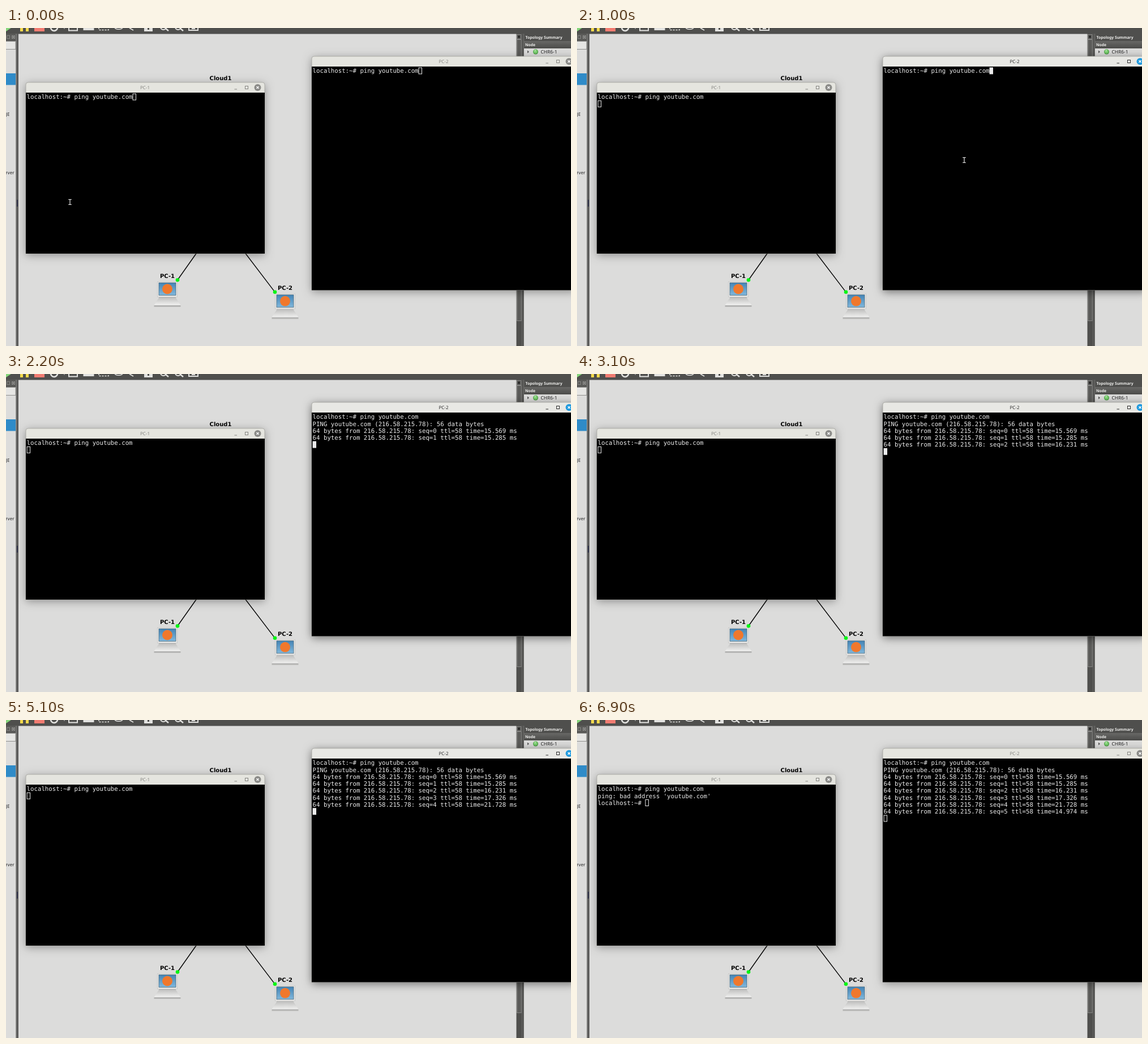
Animation, 998 px wide and 561 px high, one loop 7 s. Source, as an HTML page with a canvas:

```html
<!DOCTYPE html>
<html lang="en">
<head>
<meta charset="utf-8">
<title>Ping from two hosts</title>
<style>
html, body { margin: 0; width: 100%; height: 100%; overflow: hidden; background: #dcdcdb; }
canvas { display: block; width: 998px; height: 561px; }
</style>
</head>
<body>
<canvas id="stage" width="998" height="561"></canvas>
<script>
const ctx = document.getElementById('stage').getContext('2d');
const LOOP = 7000;
const UI = '"Noto Sans", "Open Sans", sans-serif';
const CELL = { w: 6.446, h: 12.25 };
const DARK = '#4f4f4d', LIGHT = '#dcdcdb', ICON = '#e2e2e0';

const PROMPT = 'localhost:~# ';
const COMMAND = PROMPT + 'ping youtube.com';
const REPLY_MS = ['15.569', '15.285', '16.231', '17.326', '21.728', '14.974'];

function rect(x, y, w, h, color) {
  ctx.fillStyle = color;
  ctx.fillRect(x, y, w, h);
}

function frame(x, y, w, h, color, width = 1) {
  ctx.strokeStyle = color;
  ctx.lineWidth = width;
  ctx.strokeRect(x, y, w, h);
}

function disc(x, y, r, color) {
  ctx.fillStyle = color;
  ctx.beginPath();
  ctx.arc(x, y, r, 0, Math.PI * 2);
  ctx.fill();
}

function ring(x, y, r, color, width, from = 0, to = Math.PI * 2) {
  ctx.strokeStyle = color;
  ctx.lineWidth = width;
  ctx.beginPath();
  ctx.arc(x, y, r, from, to);
  ctx.stroke();
}

function line(x1, y1, x2, y2, color, width) {
  ctx.strokeStyle = color;
  ctx.lineWidth = width;
  ctx.beginPath();
  ctx.moveTo(x1, y1);
  ctx.lineTo(x2, y2);
  ctx.stroke();
}

function shape(points, color) {
  ctx.fillStyle = color;
  ctx.beginPath();
  points.forEach(([x, y]) => ctx.lineTo(x, y));
  ctx.closePath();
  ctx.fill();
}

function fade(y1, y2, top, bottom) {
  const g = ctx.createLinearGradient(0, y1, 0, y2);
  g.addColorStop(0, top);
  g.addColorStop(1, bottom);
  return g;
}

function label(text, x, y, font, color, align = 'left') {
  ctx.font = font;
  ctx.fillStyle = color;
  ctx.textAlign = align;
  ctx.fillText(text, x, y);
}

function drawToolbar() {
  rect(0, 0, 998, 10.5, DARK);
  shape([[0, 0], [9, 0], [0, 6]], '#86d67c');
  rect(25, 0, 5, 6, '#f4d94c');
  rect(35, 0, 5, 6, '#f4d94c');
  rect(50, 0, 18, 6, '#f27c72');
  ring(85, -1, 6, ICON, 2.6, -0.2, Math.PI);
  rect(102, 0, 2, 1.5, '#999');
  frame(111, -6, 15, 10.5, ICON, 2);
  rect(136.5, 0, 19, 4, ICON);
  ctx.setLineDash([3, 2]);
  frame(164, -6, 17, 9.5, ICON, 1.5);
  ctx.setLineDash([]);
  ctx.strokeStyle = ICON;
  ctx.lineWidth = 1.5;
  ctx.beginPath();
  ctx.ellipse(199, -1, 7, 3.2, 0, 0, Math.PI * 2);
  ctx.stroke();
  line(218, 0, 225, 4, ICON, 1.8);
  rect(244, 0, 15, 6, ICON);
  rect(250, 0, 3, 3, DARK);
  for (const x of [278, 304]) {
    ring(x, -2, 5, ICON, 2);
    line(x + 3, 0, x + 9, 5, ICON, 2.4);
  }
  frame(323, -6, 16, 10, ICON, 2);
  rect(328, 0, 6, 2, ICON);
}

function drawSidePanels() {
  rect(0, 10, 18, 13, '#5a5a58');
  frame(1.5, 13.5, 5, 5, '#858583');
  frame(10.5, 13.5, 5, 5, '#858583');
  line(11, 14, 15, 18, '#a0a09e', 1);
  line(15, 14, 11, 18, '#a0a09e', 1);
  rect(0, 23, 18, 15, '#e6e6e4');
  frame(-2, 23.5, 19, 14, '#8e8e8c');
  rect(0, 80, 17, 20.5, '#2f8bc8');
  label('JE', 6.5, 155, '8px ' + UI, '#222', 'right');
  label('erver', 14.5, 258, '8px ' + UI, '#222', 'right');
  rect(17.5, 10, 4.5, 551, '#5c5c5b');
  rect(17.5, 10, 1, 551, '#858584');
  rect(19, 303, 2, 12, '#33364e');

  rect(901.5, 10, 13.5, 551, DARK);
  frame(902.5, 11.5, 7, 8, '#8b8b89');
  rect(904.5, 14, 3, 3, '#222');
  rect(903, 21, 6.5, 496, '#5b5b59');
  frame(902.5, 20.5, 7.5, 496, '#858583');
  rect(911, 10, 1, 551, '#696967');
  rect(914, 10, 1, 551, '#747472');

  rect(915, 10, 83, 26, DARK);
  label('Topology Summary', 917.5, 19.2, 'bold 6.8px ' + UI, '#f0f0ee');
  rect(915, 23, 83, 13, fade(23, 36, '#686866', '#4b4b49'));
  label('Node', 917, 32, 'bold 6.8px ' + UI, '#f0f0ee');
  shape([[921, 39.5], [924, 42], [921, 44.5]], '#555');
  disc(935.5, 42, 4.5, '#4f9c48');
  disc(935.3, 41.5, 3.5, '#77cf6c');
  disc(934.8, 40.2, 1.6, '#a9e5a0');
  label('CHR6-1', 944.5, 45, '8.4px ' + UI, '#222');
}

function drawHost(name, x, y) {
  label(name, x, y - 24.5, 'bold 10px "DejaVu Sans", sans-serif', '#000', 'center');
  rect(x - 18, y - 18, 36, 28, '#e9e9e8');
  frame(x - 17.5, y - 17.5, 35, 27, '#c9c9c8');
  rect(x - 15, y - 15.5, 30, 22, fade(y - 15, y + 7, '#4585b6', '#82b9dd'));
  frame(x - 15, y - 15.5, 30, 22, '#476578', 0.8);
  disc(x, y - 4.5, 9, '#f0782c');
  rect(x - 15, y + 10, 30, 1.5, '#b4b4b3');
  shape([[x - 15, y + 11], [x + 15, y + 11], [x + 23.5, y + 24], [x - 23.5, y + 24]],
    fade(y + 11, y + 24, '#c2c2c1', '#f0f0ef'));
  rect(x - 23.5, y + 24, 47, 3, '#b5b5b4');
}

function drawTopology() {
  label('Cloud1', 379, 92, 'bold 10px "DejaVu Sans", sans-serif', '#000', 'center');
  line(350, 378, 303, 444.5, '#000', 1.4);
  line(408, 378, 475, 465.8, '#000', 1.4);
  drawHost('PC-1', 285, 465);
  drawHost('PC-2', 493, 486.3);
  disc(303, 444.5, 3.3, '#00f514');
  disc(475, 465.8, 3.3, '#00f514');
}

function drawWindow(win, focused) {
  const { x, y, w, h, title } = win, right = x + w;
  const ink = focused ? '#2c2c2c' : '#858581';

  ctx.save();
  ctx.shadowColor = focused ? 'rgba(0,0,0,.5)' : 'rgba(0,0,0,.36)';
  ctx.shadowBlur = 16;
  ctx.shadowOffsetY = 3;
  ctx.fillStyle = focused ? '#e8e8e4' : '#e5e5df';
  ctx.beginPath();
  ctx.roundRect(x, y, w, h, [4, 4, 0, 0]);
  ctx.fill();
  ctx.restore();
  ctx.strokeStyle = '#a2a29e';
  ctx.lineWidth = 0.8;
  ctx.stroke();
  rect(x, y + 18, w, h - 18, '#000');

  label(title, x + w / 2 - 0.5, y + 12, '8px ' + UI, ink, 'center');
  rect(right - 53.5, y + 11.5, 4.5, 1, ink);
  frame(right - 34.5, y + 6.5, 5, 5, ink);
  const cx = right - 12.5, cy = y + 9;
  disc(cx, cy, 6, focused ? '#1f9ade' : '#8b8b88');
  line(cx - 2, cy - 2, cx + 2, cy + 2, '#fff', 1.3);
  line(cx + 2, cy - 2, cx - 2, cy + 2, '#fff', 1.3);
}

function drawTerminal(win, lines, focused) {
  drawWindow(win, focused);
  const x0 = win.x + 1.6, y0 = win.y + 19.5;
  ctx.font = '10.7px "DejaVu Sans Mono", monospace';
  ctx.fillStyle = '#ececec';
  ctx.textAlign = 'left';
  lines.forEach((text, row) => {
    [...text].forEach((ch, col) => ctx.fillText(ch, x0 + col * CELL.w, y0 + 9.9 + row * CELL.h));
  });
  const row = lines.length - 1;
  const x = x0 + lines[row].length * CELL.w, y = y0 + row * CELL.h;
  if (focused) rect(x, y, CELL.w, 12, '#ececec');
  else frame(x + 0.5, y + 0.5, CELL.w - 1, 11, '#ececec');
}

function drawBeam(x, y) {
  line(x, y - 4, x, y + 4, '#e8e8e8', 1.2);
  for (const end of [-4.5, 4.5]) line(x - 2.8, y + end, x + 2.8, y + end, '#e8e8e8', 1.1);
}

const pc1 = { title: 'PC-1', x: 35, y: 96, w: 422, h: 302 };
const pc2 = { title: 'PC-2', x: 540, y: 50, w: 467, h: 412.5 };

function pc1Lines(t) {
  if (t < 300) return [COMMAND];
  if (t < 5500) return [COMMAND, ''];
  return [COMMAND, "ping: bad address 'youtube.com'", PROMPT];
}

function pc2Lines(t) {
  if (t < 1100) return [COMMAND];
  const replies = REPLY_MS.slice(0, Math.floor((t - 100) / 1000))
    .map((ms, seq) => `64 bytes from 216.58.215.78: seq=${seq} ttl=58 time=${ms} ms`);
  return [COMMAND, 'PING youtube.com (216.58.215.78): 56 data bytes', ...replies, ''];
}

// The pointer hides while keys are pressed and shows again once it moves.
function drawPointer(t) {
  if (t >= 1100 || (t >= 300 && t < 500)) return;
  const k = Math.min(1, Math.max(0, (t - 400) / 500));
  const e = k * k * (3 - 2 * k);
  const x = 113 + 571 * e, y = 307 - 74 * e;
  if (x < pc1.x + pc1.w || x > pc2.x) drawBeam(x, y);
}

function draw(now) {
  const t = Math.floor((now % LOOP) / 100) * 100;
  ctx.textRendering = 'geometricPrecision';
  rect(0, 0, 998, 561, LIGHT);
  drawToolbar();
  drawSidePanels();
  drawTopology();
  drawTerminal(pc1, pc1Lines(t), t >= 100 && t < 900);
  drawTerminal(pc2, pc2Lines(t), t >= 900 && t < 6900);
  drawPointer(t);
}

const start = performance.now();
function tick() {
  draw(performance.now() - start);
  requestAnimationFrame(tick);
}
tick();
</script>
</body>
</html>
```
